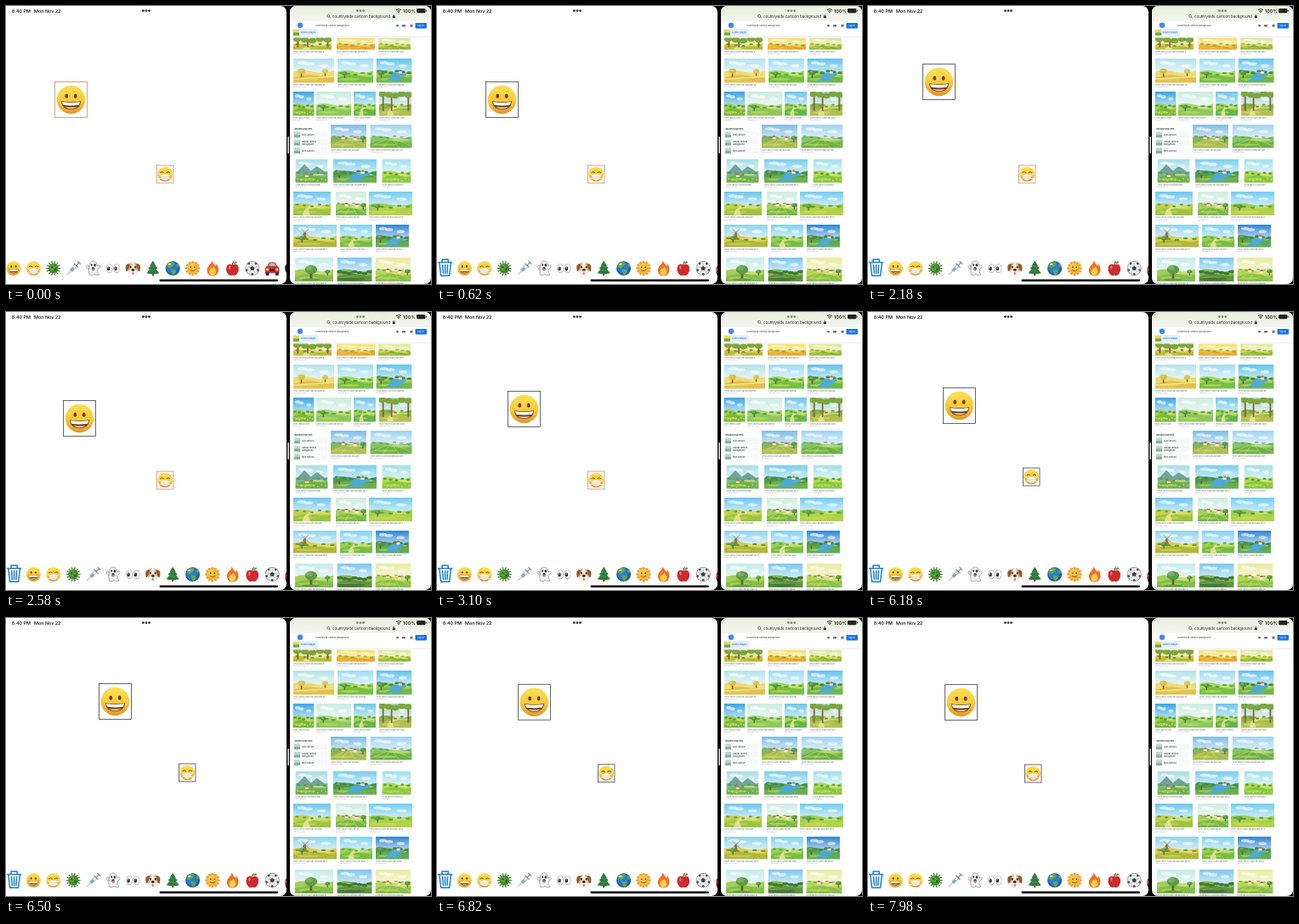
An HTML page that plays this animation: 500x328 px, repeating every 8000 ms.

```html
<!DOCTYPE html>
<html lang="en">
<head>
<meta charset="utf-8">
<title>Emoji canvas beside image search</title>
<style>
html, body { margin: 0; width: 100%; height: 100%; overflow: hidden; background: #000; }
svg { display: block; width: 500px; height: 328px; font-family: Inter, "Liberation Sans", sans-serif; }
</style>
</head>
<body>
<svg id="stage" viewBox="0 0 500 328"></svg>
<script>
const el = (x, y, rx, ry, fill) => `<ellipse cx="${x}" cy="${y}" rx="${rx}" ry="${ry}" fill="${fill}"/>`;
const dot = (x, y, r, fill) => el(x, y, r, r, fill);
const box = (x, y, w, h, fill, r = 0) => `<rect x="${x}" y="${y}" width="${w}" height="${h}" rx="${r}" fill="${fill}"/>`;
const path = (d, fill, extra = '') => `<path d="${d}" fill="${fill}" ${extra}/>`;
const line = (d, color, width = 1) =>
  `<path d="${d}" fill="none" stroke="${color}" stroke-width="${width}" stroke-linecap="round" stroke-linejoin="round"/>`;
const text = (x, y, size, str, fill = '#222', extra = '') =>
  `<text x="${x}" y="${y}" font-size="${size}" fill="${fill}" ${extra}>${str}</text>`;
const at = (x, y, body, extra = '') => `<g transform="translate(${x} ${y}) ${extra}">${body}</g>`;
const ring = (n, draw) => Array.from({ length: n }, (_, i) => draw(i * 2 * Math.PI / n)).join('');

// Emoji, each centred on 0,0 with a radius near 9
const brown = '#6a3c14';
const face = dot(0, 0, 9, 'url(#skin)');
const emoji = {
  grin: face + el(-2.8, -2.3, 1, 1.4, brown) + el(2.8, -2.3, 1, 1.4, brown) +
    path('M-6.3 .9Q0 2 6.3 .9Q5.7 6.2 0 6.2Q-5.7 6.2-6.3 .9Z', '#74421a') +
    path('M-5.8 1.4Q0 2.4 5.8 1.4L5.1 3.4Q0 4.2-5.1 3.4Z', '#fff') + path('M-4 4.6Q0 5.2 4 4.6Q2.4 5.8 0 5.8Q-2.4 5.8-4 4.6Z', '#e9dccb'),
  mask: face + line('M-5.4-2.2Q-3.6-3.7-1.9-2.2M5.4-2.2Q3.6-3.7 1.9-2.2', brown, 1) +
    line('M-8-.4L-5 1.4M8-.4L5 1.4M-6.6 5.2L-4 5M6.6 5.2L4 5', '#f0ece2', .9) +
    path('M-5.2 1.2Q0-1.4 5.2 1.2Q5.6 6.4 0 7.3Q-5.6 6.4-5.2 1.2Z', '#f7f6f4') +
    line('M-4.4 3H4.4M-4 4.9H4', '#c9c6c2', .6),
  microbe: ring(14, a => line(`M0 0L${8.3 * Math.cos(a)} ${8.3 * Math.sin(a)}`, '#3a7a25', 1) +
      dot(8 * Math.cos(a), 8 * Math.sin(a), .8, '#2f6a20')) +
    dot(0, 0, 6.3, '#3f8a2a') + dot(-1, -1, 4, '#5aa33a') + dot(-2, -1.5, 1.4, '#2d6b20') + dot(2.2, 1.2, 1.6, '#2d6b20') + dot(1.4, -3, .8, '#2d6b20'),
  syringe: `<g transform="rotate(45)">${line('M0 4V11', '#8a949d', .8) + box(-2.2, -5, 4.4, 9.6, '#a9b9c4', .6) + box(-1.5, -4.4, 3, 4, '#e6eef2') +
    box(-1.5, -.6, 3, 4.4, '#6fb0cf') + line('M-3.4-5H3.4M0-5V-10M-2.4-10H2.4', '#7c868f', 1.2)}</g>`,
  ghost: path('M-5 8Q-6 2-5-2Q-4.4-9 0-9Q4.4-9 5-3Q8.5-5 8.5-2Q7.4 1 5.4 1Q4.6 6 7.4 8Q3 9.6 1 7.4Q-2 9.8-5 8ZM-5-3Q-8.5-5-8.5-2Q-7.4 1-5.4 1Z', '#f3f3f6', 'stroke="#8e8f97" stroke-width=".8"') +
    el(-1.9, -4.2, 1, 1.4, '#333') + el(2, -4, 1.4, 1.8, '#333') + el(0, .4, 1.9, 2.1, '#444') + el(0, 1.8, 1.3, 1.6, '#e0707c'),
  eyes: [-4.4, 4.4].map(x => el(x, 0, 4, 5.8, '#9a9a9a') + el(x, 0, 3.5, 5.3, '#fff') + el(x - 1.2, .4, 1.8, 2.6, '#2b211d') +
    dot(x - 1.5, -.6, .6, '#fff')).join(''),
  dog: el(0, 0, 7, 8, '#dfb483') + path('M-5-6Q-11-5-8.4 4Q-5 3-4-5ZM5-6Q11-5 8.4 4Q5 3 4-5Z', '#8d5a30') +
    path('M-1.5-8H1.5L2.6 0H-2.6Z', '#faf0e4') + el(0, 4, 5, 3.8, '#fbf3ea') + dot(-3, -1.4, 1.2, '#2d1b12') + dot(3, -1.4, 1.2, '#2d1b12') +
    el(0, 2, 2, 1.4, '#2d1b12') + el(0, 6.2, 1.2, 1.6, '#e5707a'),
  tree: box(-1.2, 5, 2.4, 4, '#7b4a25') + path('M0-9.5L4-3H2.6L6-.2L4 1L8 6Q0 8-8 6L-4 1L-6-.2L-2.6-3H-4Z', '#2f7a3b') +
    line('M-2-3L2-2M-4 2L3 3', '#4c9a50', .9),
  globe: dot(0, 0, 9, '#1b5fae') + dot(-1, -1, 7, '#2a7dcc') + path('M-7-5Q-3-9 1-8L2-5L-1-2L-4 0L-7-2ZM-2 1L4 2L4 5L1 9L-1 7Z', '#6aa548') +
    path('M5-7L8-4L7-1L5-3Z', '#6aa548') + el(-4, -5, 2, 1, '#cfe6f4'),
  sun: ring(12, a => dot(7.5 * Math.cos(a), 7.5 * Math.sin(a), 1.7, '#eb9d2b')) + dot(0, 0, 7.2, '#f5b436') + dot(-1, -1.5, 4.6, '#fac84c') +
    dot(-2.3, -1.5, .9, brown) + dot(2.3, -1.5, .9, brown) + line('M-3 2.2Q0 4.4 3 2.2', brown, .8),
  fire: path('M-1-9.5Q1-6 4-3Q5-4 5-6Q9 1 6.5 6Q4 9.5 0 9.5Q-5 9.5-6.5 5Q-8 0-4-4Q-1-6-1-9.5Z', '#f0702a') +
    path('M1-2Q5 3 4 6Q2 9 0 9Q-4 8.5-4 5Q-4 2-2 0Q0 1 1-2Z', '#ffd04a'),
  apple: path('M0-4Q4-7 7-3Q9 2 5.5 7Q3 10 0 8.4Q-3 10-5.5 7Q-9 2-7-3Q-4-7 0-4Z', '#cf2a2c') +
    line('M0-4Q0-7 1.5-8.5', '#6b4423', 1.1) + path('M1-6Q3-10 6-8Q5-5 1-6Z', '#5ca53a') + el(-3.6, -1, 1.2, 2.4, '#ee7a78'),
  ball: dot(0, 0, 8.9, '#77797c') + dot(0, 0, 8.2, '#eceded') + path('M0-3L2.8-.9L1.8 2.4H-1.8L-2.8-.9Z', '#3a3c3f') +
    ring(5, a => dot(7.2 * Math.sin(a + .63), -7.2 * Math.cos(a + .63), 1.4, '#4a4c50') +
      line(`M${3 * Math.sin(a)} ${-3 * Math.cos(a)}L${6 * Math.sin(a)} ${-6 * Math.cos(a)}`, '#8b8d90', .5)),
  car: path('M-8.8 1Q-9-2-6-3L-4-7Q0-8.4 4-7L6-3Q9-2 8.8 1V6H-8.8Z', '#cf3531') + path('M-4.6-3L-3-6Q0-7 3-6L4.6-3Z', '#9cc3d6') +
    box(-8, 5, 4, 4, '#2a2a2c', 1) + box(4, 5, 4, 4, '#2a2a2c', 1) + dot(-6, 1.5, 1.5, '#ffe7a0') + dot(6, 1.5, 1.5, '#ffe7a0') +
    box(-3.4, 1, 6.8, 2.6, '#4a2022', .6),
  disc: dot(0, 0, 9, '#2c2a2b')
};
const trash = line('M1.6 302.4H17.6M6 302V299H13.2V302M2.8 303L4.6 318.2H14.6L16.4 303M6.6 305.6L7.3 315.4M9.6 305.6V315.4M12.6 305.6L11.9 315.4', '#1b7fce', 1.5);

// Thumbnails: rows are [top, height, "x width sky far near feature", ...]
const rows = [
  [37.5, 14, '338 45 f2d95c e3bd3a a9bd3c woods', '389 45 f8dc58 f3bb30 ee9a2f field', '438 38 dfe48a d9d94a 7fae3a field'],
  [62, 28.5, '338 48 b4e4ea f0da74 e3bf4c savanna', '390 42 a0dcf0 a5d85a 76c043 bushes', '435.5 42 63c3ea a3cc4e 6fb848 lake'],
  [101, 28.5, '337.5 25 3aa5e6 a5cf4a 77b83e flowers', '365 41 c9ecdf a6d66c 8cc85a bushes', '409 26 6cc6e8 a0d455 62b648 path', '439 38 a6d6c8 8db548 b3bf4e woods'],
  [140, 27.5, '382 42 7fbde6 86b45c a9bc55 village', '428.5 49 9fd3f2 86c468 6cb04a field'],
  [180.5, 28, '340.5 38 a9dde6 7db68a 6db04e peaks', '385 51 78cdec 4f9a55 6cb04c lake', '442.5 34 9fe0ea b4d850 84c845 flowers'],
  [219, 28, '338 44 6cc6ee c3d04a 9cc442 path', '388 36 cdece0 a6d05a 76b94a village', '427 51 72cdf0 a0cf4a b3d24c bushes'],
  [258, 26.5, '338 51 8fd4e8 e0c850 b0b83c mill', '393 38 7fd2f2 98cf52 76bd46 path', '435 39 2f86d4 5ba04e 5fae50 lake'],
  [296.5, 28.5, '340 45 c4ebea a3cf58 84bd4c tree', '389.5 41 78c6f0 86b848 5f9440 trees', '434.5 42 e8ec9a b8d654 88c04c village']
];

const tree = (x, y, s, leaf = '#4f9440') =>
  at(x, y, box(-.7, -4, 1.4, 4, '#80552b') + el(0, -5.6, 3.6, 2.6, leaf) + el(-1, -6.4, 2, 1.3, '#ffffff30'), `scale(${s})`);
const house = (x, y) => box(x - 2, y - 2.4, 4, 2.4, '#f5efdc') + path(`M${x - 2.6} ${y - 2.4}L${x - 1} ${y - 4.4}H${x + 1}L${x + 2.6} ${y - 2.4}Z`, '#d0704e');
const mounds = (w, y, n, draw) => Array.from({ length: n }, (_, i) => draw((i + .5) * w / n, y + i * 7 % 3)).join('');

const features = {
  trees: (w, h) => mounds(w, h * .6, 7, (x, y) => el(x, y, 3.6, 1.8, '#3f7a38')) + el(w * .4, h * .9, w * .4, 2, '#42783a'),
  field: (w, h) => [.2, .4, .6, .8].map(k => line(`M${w * .5} ${h * .55}L${w * (k * 2 - .5)} ${h}`, '#e2e05aa0', .8)).join('') +
    mounds(w, h * .5, 6, (x, y) => el(x, y, 2.4, 1, '#4c8f4690')),
  savanna: (w, h) => tree(w * .2, h * .76, 1.2, '#d6bd4a') + tree(w * .78, h * .72, 1, '#d9c250') + line(`M0 ${h * .85}L${w} ${h * .75}`, '#f6e79a', 1.2),
  bushes: (w, h) => mounds(w, h * .6, 5, (x, y) => el(x, y, 2.8, 1.2, '#5da345')) + tree(w * .2, h * .8, .9),
  lake: (w, h) => path(`M${w * .3} ${h * .6}H${w * .8}Q${w * .95} ${h * .7} ${w * .6} ${h * .78}L${w * .75} ${h * .92}H${w * .25}Q${w * .6} ${h * .7} ${w * .3} ${h * .6}Z`, '#4fa9dd') +
    mounds(w, h * .52, 6, (x, y) => el(x, y, 2.8, 1.5, '#3f8a48')) + tree(w * .14, h * .8, 1.1) + house(w * .68, h * .62),
  flowers: (w, h) => mounds(w, h * .84, 8, (x, y) => dot(x, y, .8, '#f3e24a')) + mounds(w, h * .58, 5, (x, y) => el(x, y, 2, 1.2, '#55a045')),
  tree: (w, h) => tree(w * .42, h * .9, 2, '#5c9c42') + tree(w * .85, h * .75, .8) + el(w * .42, h * .92, w * .25, 1.4, '#5f9e3e'),
  path: (w, h) => path(`M${w * .55} ${h * .5}Q${w * .75} ${h * .65} ${w * .4} ${h * .75}L${w * .45} ${h}H${w * .25}Q${w * .25} ${h * .72} ${w * .55} ${h * .5}Z`, '#e4e08c') +
    mounds(w, h * .55, 5, (x, y) => el(x, y, 2.2, 1.1, '#5da34c')),
  woods: (w, h) => features.path(w, h) + [.1, .36, .88].map(k => box(w * k, h * .2, 1.8, h * .6, '#85633a')).join('') +
    mounds(w, h * .1, 5, (x, y) => el(x, y, 4.8, 3.4, '#7ba63e')),
  village: (w, h) => features.field(w, h) + house(w * .35, h * .62) + house(w * .68, h * .66) + tree(w * .9, h * .75, .9),
  peaks: (w, h) => path(`M0 ${h * .62}L${w * .28} ${h * .22}L${w * .48} ${h * .5}L${w * .66} ${h * .3}L${w} ${h * .62}Z`, '#72a39a') +
    features.flowers(w, h) + house(w * .35, h * .76),
  mill: (w, h) => path(`M${w * .24} ${h * .35}h2.4l1.2 ${h * .3}h-4.8Z`, '#a6703f') +
    line(`M${w * .19} ${h * .2}L${w * .35} ${h * .5}M${w * .35} ${h * .2}L${w * .19} ${h * .5}`, '#95683f', .6) + features.bushes(w, h)
};

function thumb(spec, y, h) {
  let [x, w, sky, far, near, feature] = spec.split(' ');
  x = +x; w = +w;
  const scene = box(0, 0, w, h, '#' + sky) + box(0, 0, w, h, 'url(#haze)') +
    [.22, .4, .75].map(k => el(w * k, h * (.12 + k / 4), w * .12, h * .07, '#ffffffa0')).join('') +
    path(`M0 ${h * .54}Q${w * .25} ${h * .44} ${w * .5} ${h * .55}T${w} ${h * .5}V${h}H0Z`, '#' + far) +
    path(`M0 ${h * .8}Q${w * .35} ${h * .6} ${w * .65} ${h * .72}T${w} ${h * .68}V${h}H0Z`, '#' + near) +
    el(w * .7, h * .66, w * .25, h * .05, '#e6ee7a90') + el(w * .35, h * .86, w * .28, h * .05, '#d8e66080') + features[feature](w, h);
  return `<svg x="${x}" y="${y}" width="${w}" height="${h}">${scene}</svg>` +
    text(x, y + h + 3, 1.9, 'Vector cartoon countryside landscape with hills'.slice(0, w * .85), '#666') +
    text(x, y + h + 5.6, 1.7, 'landscape pictures'.slice(0, w * .4), '#999');
}

const dots = (x, fill) => [-3.6, 0, 3.6].map(d => dot(x + d, 5.6, 1.4, fill)).join('');
const query = 'countryside cartoon background';
const bold = 'font-weight="600"';
const related = ['cute cartoon', 'natural cartoon', 'farm cartoon'].map((label, i) => {
  const y = 148.5 + i * 9.4;
  return box(338, y - .6, 40, 8, '#f8f9fa', 1) + box(339, y, 7, 6.6, '#b9d6da') + box(339, y + 3.6, 7, 3, '#86b384') +
    text(348, y + (i === 1 ? 3 : 4.2), 2.4, label) + (i === 1 ? text(348, y + 6, 2.4, 'background') : '');
}).join('');

const browser = `<g clip-path="url(#rightPane)">` +
  box(334, 0, 166, 328, '#fff') + box(334, 0, 166, 18, 'url(#bar)') + box(334, 36, 166, .6, '#dfe1e5') +
  dots(417, '#7d8775') + text(467, 7.7, 5.4, '100%', '#222', bold) +
  line('M459.3 4.4Q462 2.4 464.7 4.4M460.5 6Q462 4.9 463.5 6', '#222', .9) + dot(462, 7.2, .7, '#222') +
  box(483, 3, 10.5, 5.2, '#222', 1.4) + box(494, 4.6, .8, 2, '#222', .4) +
  `<circle cx="379.2" cy="11.8" r="1.5" fill="none" stroke="#333" stroke-width=".6"/>` + line('M380.3 12.9L381.6 14.2', '#333', .6) +
  text(384, 14.2, 4.4, query) + box(454.8, 11.5, 3, 2.7, '#333', .5) + line('M455.5 11.5V10.7Q456.3 9.6 457.1 10.7V11.5', '#333', .5) +
  dot(346, 22.7, 3.2, '#4285f4') + text(364, 24.3, 2.55, query, '#333') +
  dot(460.5, 23.2, 1.4, '#72767b') + box(466, 22, 4, 2.6, '#72767b', .6) + box(475.5, 21.8, 3, 3, '#72767b', .5) +
  box(481.5, 20, 13.5, 6.4, '#1a73e8', .8) + text(488.2, 24, 2.4, 'Sign in', '#fff', 'text-anchor="middle"') +
  box(337, 27, 30, 8.6, '#e3effc', 1) + box(338, 28, 7, 6.6, '#f2d553') + box(338, 31.5, 7, 3.1, '#5eaa43') +
  text(347, 32.3, 2.4, 'Related images', '#1967d2') +
  rows.map(([y, h, ...specs]) => specs.map(s => thumb(s, y, h)).join('')).join('') +
  text(339.5, 145.5, 2.5, 'Related searches', '#222', bold) + related + '</g>';

const sticker = (id, body, w, h, scale) => `<g id="${id}">` + at(w / 2, h / 2, body, `scale(${scale})`) +
  `<rect width="${w}" height="${h}" fill="none" stroke-width=".8"/></g>`;
const strip = Object.values(emoji).map((e, i) => at(9 + i * 23.4, 309.5, e, 'scale(.95)')).join('');

const stage = document.getElementById('stage');
stage.innerHTML = `<defs>
  <linearGradient id="skin" x2="0" y2="1"><stop stop-color="#fbdf52"/><stop offset=".55" stop-color="#f8c93a"/><stop offset="1" stop-color="#e0962a"/></linearGradient>
  <linearGradient id="haze" x2="0" y2="1"><stop stop-color="#fff" stop-opacity="0"/><stop offset=".55" stop-color="#fff" stop-opacity=".6"/></linearGradient>
  <linearGradient id="bar" x2="0" y2="1"><stop stop-color="#e8f0dc"/><stop offset="1" stop-color="#f4f6f0"/></linearGradient>
  <clipPath id="leftPane"><rect x="-10" width="340" height="328" rx="7"/></clipPath>
  <clipPath id="rightPane"><rect x="334" width="166" height="328" rx="7"/></clipPath></defs>` +
  `<g clip-path="url(#leftPane)">` + box(0, 0, 330, 328, '#fff') +
  text(6.8, 7.7, 5.4, '8:40 PM', '#222', bold) + text(33, 7.7, 5.4, 'Mon Nov 22', '#222', bold) + dots(165, '#333') +
  `<g id="strip">${strip}</g><g id="trash">${trash}</g>` +
  sticker('big', emoji.grin, 38, 42, 1.86) + sticker('small', emoji.mask, 19.5, 21, .98) + '</g>' +
  browser + box(331.3, 154, 1.6, 20, '#e8e8e8', .8) + box(180.5, 322.6, 139.5, 2.3, '#000', 1.1);

// Drag paths as [ms, x, y]
const firstDrag = [[2179, 57.5, 89.5], [2180, 64.5, 68.5], [2260, 64.5, 68.5], [2580, 67.5, 104.5], [3020, 83.5, 93.5]];
const groupDrag = [[6179, 0, 0], [6180, 5, -4], [6260, 5, -4], [6500, 26, -16], [6980, 7, -15]];

function follow(keys, t) {
  const next = keys.findIndex(k => k[0] > t);
  if (next === 0) return keys[0].slice(1);
  if (next < 0) return keys[keys.length - 1].slice(1);
  const [t0, x0, y0] = keys[next - 1], [t1, x1, y1] = keys[next];
  const u = (t - t0) / (t1 - t0), k = u * u * (3 - 2 * u);
  return [x0 + (x1 - x0) * k, y0 + (y1 - y0) * k];
}

const [stripEl, trashEl, big, small] = ['strip', 'trash', 'big', 'small'].map(id => document.getElementById(id));
function place(node, x, y, selected) {
  node.setAttribute('transform', `translate(${x} ${y})`);
  node.lastChild.setAttribute('stroke', selected ? '#444' : '#d08a72');
}

function draw(now) {
  const t = Math.floor((now % 8000 - 20) / 40) * 40 + 20; // 25 steps a second
  const firstPick = t >= 500 && t < 3700;
  const [x, y] = follow(firstDrag, t), [dx, dy] = follow(groupDrag, t);
  place(big, x + dx, y + dy, firstPick || t >= 5700);
  place(small, 177.5 + dx, 188 + dy, t >= 4980);
  const picked = firstPick || t >= 4980;
  trashEl.setAttribute('visibility', picked ? 'visible' : 'hidden');
  stripEl.setAttribute('transform', `translate(${picked ? 23.4 : 0} 0)`);
}

const start = performance.now();
function tick() {
  draw(performance.now() - start);
  requestAnimationFrame(tick);
}
tick();
</script>
</body>
</html>
```
